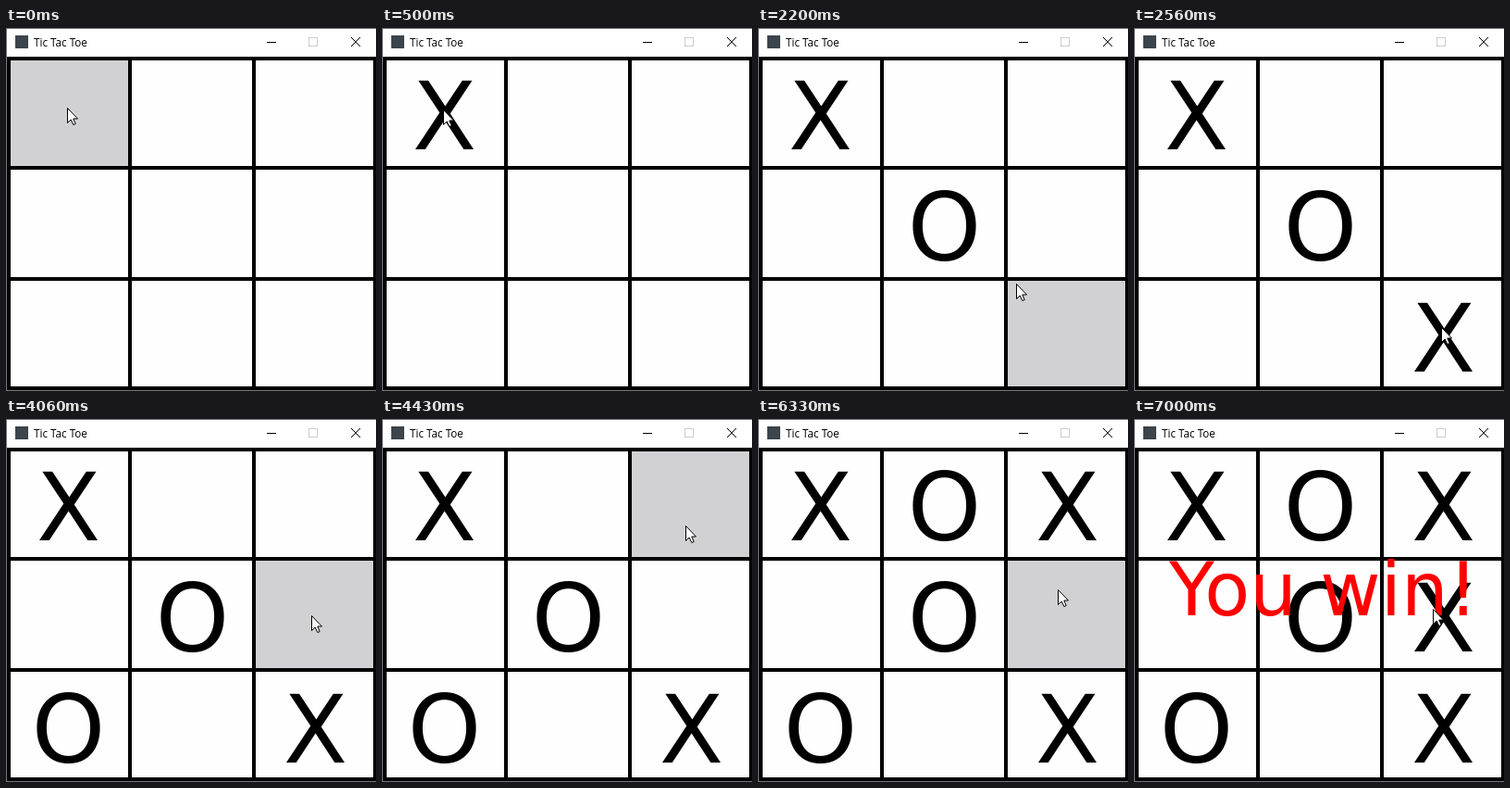
These frames come from a looping animation (400 by 392 pixels, 8.36 s). An HTML page:

```html
<!DOCTYPE html>
<html lang="en">
<head>
<meta charset="utf-8">
<title>Tic Tac Toe</title>
<style>
  html, body { margin: 0; width: 100%; height: 100%; overflow: hidden; }
  svg { display: block; }
  .title { font: 11.7px "Open Sans", "Noto Sans", sans-serif; }
  .mark { font: 101px "DejaVu Sans", sans-serif; text-anchor: middle; }
  .result { font: 80px "DejaVu Sans", sans-serif; fill: #f00; }
</style>
</head>
<body>
<svg width="400" height="392" viewBox="0 0 400 392">
  <rect width="400" height="392" fill="#777"/>
  <rect x="1" y="1" width="399" height="30" fill="#fff"/>
  <rect x="10" y="8" width="14" height="14" fill="#3c444c"/>
  <text class="title" x="30" y="20">Tic Tac Toe</text>
  <g fill="none" stroke="#000">
    <path d="M282 15.5h10M373 10l10 10m0-10l-10 10"/>
    <rect x="327.5" y="10.5" width="9" height="9" stroke="#ccc"/>
  </g>
  <rect x="1" y="31" width="399" height="360"/>
  <g id="board"></g>
  <text class="result" id="result" x="38" y="212">You win!</text>
  <path id="cursor" d="M.5 .5V16.5L4.2 13L6.8 18.5L9.2 17.5L6.8 12H11.5Z" fill="#fff" stroke="#000"/>
</svg>
<script>
const LOOP = 8360, STEP = 33, WIN_TIME = 7000;
const columns = [[5, 132], [136, 266], [270, 397]];
const rows = [[35, 149], [153, 269], [273, 387]];
const markX = [67.5, 201.5, 334.5], markY = [131, 251, 371];

// Each turn: time, cell, mark
const turns = [
  [500, 0, 'X'], [1330, 4, 'O'], [2560, 8, 'X'], [3460, 6, 'O'],
  [4730, 2, 'X'], [5600, 1, 'O'], [6630, 5, 'X'],
];

const smooth = u => u * u * (3 - 2 * u);
const flick = u => .76 * (1 - (1 - u) ** 4) + .24 * u;
const moves = [
  { start: 500, steps: 1, to: [66, 88], ease: smooth },
  { start: 1900, steps: 14, to: [332, 323], ease: smooth },
  { start: 3930, steps: 19, to: [327.5, 107], ease: flick },
  { start: 6130, steps: 10, to: [323, 205], ease: smooth },
];

const byId = id => document.getElementById(id);
const board = byId('board'), result = byId('result'), cursor = byId('cursor');

function add(tag, attributes) {
  const node = document.createElementNS('http://www.w3.org/2000/svg', tag);
  for (const name in attributes) node.setAttribute(name, attributes[name]);
  return board.appendChild(node);
}

const cells = rows.flatMap(([top, bottom], r) => columns.map(([left, right], c) => {
  const rect = add('rect', { x: left, y: top, width: right - left, height: bottom - top });
  const text = add('text', { class: 'mark', x: markX[c], y: markY[r] });
  const contains = (x, y) => x >= left && x < right && y >= top && y < bottom;
  return { rect, text, contains };
}));

function cursorAt(time) {
  let position = [66, 86];
  for (const { start, steps, to, ease } of moves) {
    if (time < start) break;
    const step = Math.floor((time - start) / STEP) + 1;
    const amount = ease(Math.min(1, step / steps));
    position = position.map((from, i) => Math.round(from + (to[i] - from) * amount));
  }
  return position;
}

function draw(now) {
  const time = now % LOOP;
  const [x, y] = cursorAt(time);
  cells.forEach(({ rect, text, contains }, index) => {
    const turn = turns.find(([at, cell]) => cell === index && time >= at);
    text.textContent = turn ? turn[2] : '';
    rect.setAttribute('fill', !turn && contains(x, y) ? '#d1d1d3' : '#fefefe');
  });
  result.setAttribute('visibility', time >= WIN_TIME ? 'visible' : 'hidden');
  cursor.setAttribute('transform', `translate(${x} ${y})`);
}

let origin;
function tick(now) {
  origin ??= now;
  draw(now - origin);
  requestAnimationFrame(tick);
}
draw(0);
requestAnimationFrame(tick);
</script>
</body>
</html>
```
